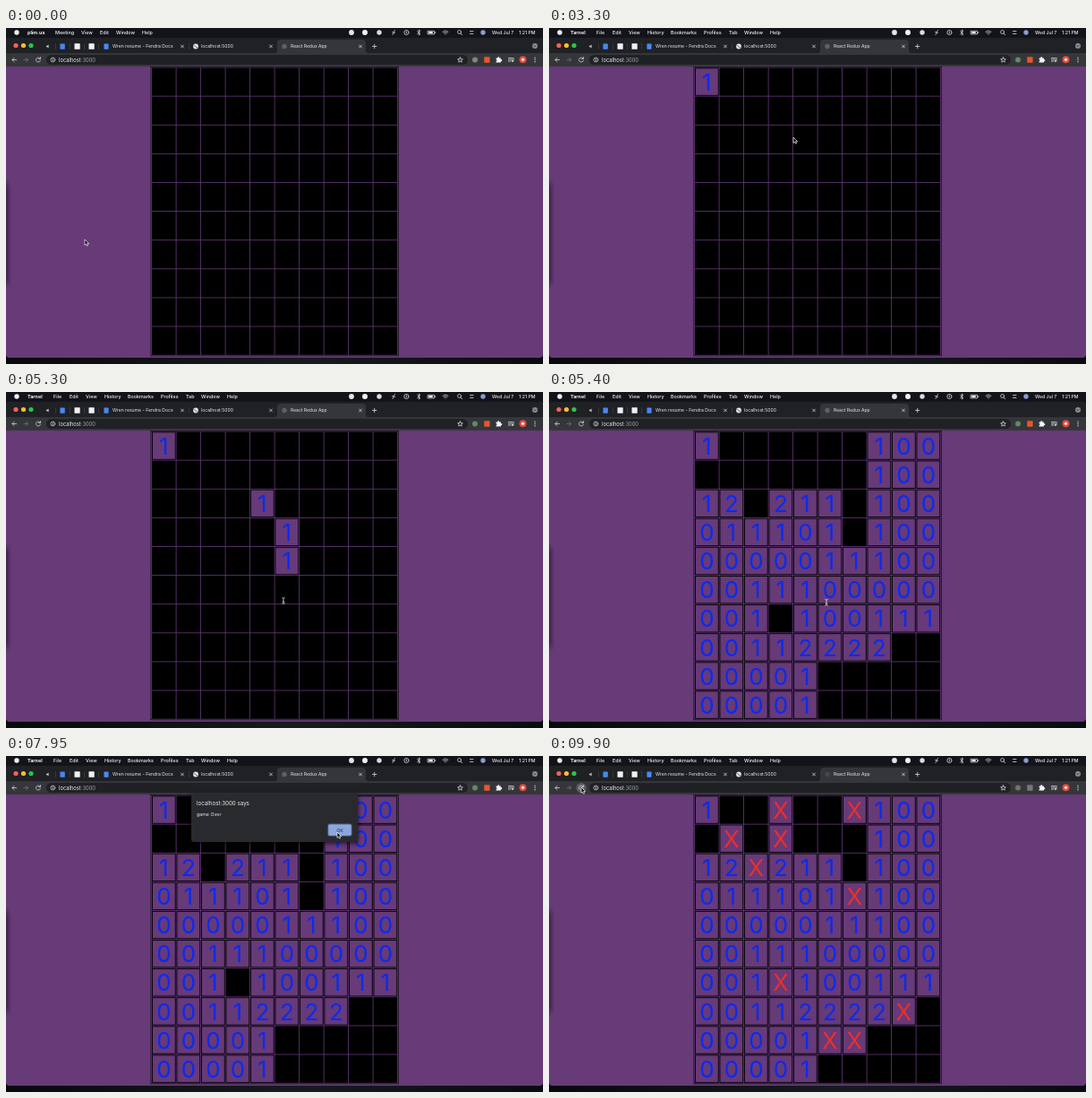
These frames come from a looping animation (600x375 px, 10000 ms). An HTML page:

```html
<!DOCTYPE html>
<html lang="en">
<head>
<meta charset="utf-8">
<title>Minesweeper</title>
<style>
  html, body { margin: 0; width: 100%; height: 100%; overflow: hidden; background: #0b0e13; }
  svg { display: block; width: 100%; height: 100%; }
  text { font-family: Inter, Roboto, sans-serif; fill: #e8eaed; white-space: pre; }
  .line { fill: none; stroke: #d5d7da; stroke-width: .8; stroke-linecap: round; stroke-linejoin: round; }
</style>
</head>
<body>
<svg id="stage" viewBox="0 0 600 375">
  <defs>
    <linearGradient id="edge">
      <stop offset="0" stop-color="#1c0f24" stop-opacity=".5"/>
      <stop offset="1" stop-color="#1c0f24" stop-opacity="0"/>
    </linearGradient>
    <linearGradient id="desk">
      <stop offset="0" stop-color="#07090c"/>
      <stop offset=".55" stop-color="#171b20"/>
      <stop offset="1" stop-color="#080b10"/>
    </linearGradient>
    <filter id="soft" x="-20%" y="-20%" width="140%" height="150%">
      <feGaussianBlur stdDeviation="2.2"/>
    </filter>
    <filter id="blur" x="-50%" y="-10%" width="200%" height="120%">
      <feGaussianBlur stdDeviation="0 3"/>
    </filter>
  </defs>
</svg>
<script>
const LOOP = 10000, STEP = 50;
const PURPLE = '#673a78', BLUE = '#0a2bf0', RED = '#ea2f2c';
const stage = document.getElementById('stage');

function add(parent, tag, attrs, text) {
  const el = document.createElementNS('http://www.w3.org/2000/svg', tag);
  for (const key in attrs) el.setAttribute(key, attrs[key]);
  if (text !== undefined) el.textContent = text;
  return parent.appendChild(el);
}
const group = (parent = stage, attrs = {}) => add(parent, 'g', attrs);
const rect = (p, x, y, width, height, fill, rx = 0) => add(p, 'rect', { x, y, width, height, fill, rx });
const dot = (p, cx, cy, r, fill) => add(p, 'circle', { cx, cy, r, fill });
const line = (p, d, attrs = {}) => add(p, 'path', { d, class: 'line', ...attrs });
const label = (p, x, y, size, text, attrs = {}) => add(p, 'text', { x, y, 'font-size': size, ...attrs }, text);
const show = (el, on) => el.setAttribute('visibility', on ? 'visible' : 'hidden');

// Desktop and menu bar
rect(stage, 0, 0, 600, 375, 'url(#desk)');
rect(stage, 0, 0, 600, 11, '#12141a');
dot(stage, 12, 5, 2.7, '#f2f2f2');

function menu(items) {
  const g = group();
  items.forEach(([x, name], i) =>
    label(g, x, 7, 5.4, name, { 'font-weight': i ? 500 : 700, style: 'fill:#f4f4f4' }));
  return g;
}
const callMenu = menu([[24, 'plim.us'], [55, 'Meeting'], [84, 'View'], [105, 'Edit'], [123, 'Window'], [152, 'Help']]);
const webMenu = menu([[24, 'Tarnel'], [53, 'File'], [71, 'Edit'], [89, 'View'], [110, 'History'], [136, 'Bookmarks'],
  [173, 'Profiles'], [201, 'Tab'], [218, 'Window'], [247, 'Help']]);

dot(stage, 386, 5, 2.9, '#e6e6e6');
dot(stage, 401, 5, 3, '#f0f0f0');
dot(stage, 417, 5, 2.7, '#dcdcdc');
line(stage, 'M432 7.5L434.5 2.5M431.5 4.5L434.5 5.5');
line(stage, 'M450 5a2.6 2.6 0 1 1-5.2 0a2.6 2.6 0 1 1 5.2 0M447.4 3.8v2.2');
line(stage, 'M459.6 3.4L463 6.6L461.3 8V2L463 3.4L459.6 6.6', { 'stroke-width': .6 });
line(stage, 'M471.5 3.3h7v3.6h-7zM479.7 4.5v1.2', { 'stroke-width': .6 });
rect(stage, 472.2, 4, 4.6, 2.2, '#e8e8e8');
line(stage, 'M488 4.2q3-2.6 6 0M489.2 5.7q1.8-1.5 3.6 0M491 7.2v.1');
line(stage, 'M508.6 4.5a2 2 0 1 1-4 0a2 2 0 1 1 4 0M508 6l1.7 1.8');
line(stage, 'M518.5 3.5h3.5M518.5 6.5h3.5', { 'stroke-width': 1.5 });
dot(stage, 533, 5, 2.7, '#8d9bd0');
label(stage, 543, 7, 5.2, 'Wed Jul 7', { 'font-weight': 500 });
label(stage, 573, 7, 5.2, '1:21 PM', { 'font-weight': 500 });

// Browser window
add(stage, 'path', { d: 'M0 15q0-4 4-4H596q4 0 4 4V364q0 4-4 4H4q-4 0-4-4z', fill: PURPLE });
add(stage, 'path', { d: 'M0 28V15q0-4 4-4H596q4 0 4 4V28z', fill: '#202124' });
rect(stage, 0, 28, 600, 15, '#35363a');
rect(stage, 0, 42.6, 600, .6, '#4a3b50');
['#ff5f57', '#febc2e', '#28c840'].forEach((c, i) => dot(stage, 11 + i * 8.5, 19.5, 2.6, c));

const cross = x => line(stage, `M${x - 1.4} 19.1l2.8 2.8m0-2.8l-2.8 2.8`, { 'stroke-width': .7 });
add(stage, 'path', { d: 'M300 28q3 0 3-3V17q0-4 4-4H398q4 0 4 4V25q0 3 3 3z', fill: '#35363a' });
add(stage, 'path', { d: 'M45 19.7h1.2l1.4-1.3v4.2l-1.4-1.3H45z', fill: '#c8cacd' });
rect(stage, 60.4, 17.5, 5.4, 6.2, '#4688f4', .6);
[76.5, 92.5].forEach(x => rect(stage, x, 17.3, 6.2, 6.4, '#f1f1f1', .5));
rect(stage, 109.4, 17.5, 5.2, 6.2, '#4688f4', .6);
label(stage, 119, 22.4, 5.1, 'Wren resume - Fendra Docs');
cross(197);
dot(stage, 212, 20.5, 2.9, '#e3e4e6');
line(stage, 'M210 19.5q2 .2 2 1.4t1.8 1', { stroke: '#202124', style: 'stroke:#55585c' });
label(stage, 218, 22.4, 5.1, 'localhost:5000');
cross(296);
[55, 71, 87, 103, 204.5].forEach(x => rect(stage, x, 17, .5, 7, '#4a4c50'));
const favicon = dot(stage, 311, 20.5, 2.7, '#5d6166');
label(stage, 318, 22.4, 5, 'React Redux App');
cross(396);
line(stage, 'M409.5 20.5h4.4m-2.2-2.2v4.4');
dot(stage, 591, 20, 3, '#8b8d91');
line(stage, 'M589.8 19.6l1.2 1.2l1.2-1.2', { style: 'stroke:#202124' });

// Toolbar
line(stage, 'M11.6 35.5H7m2.1-2.2L6.9 35.5l2.2 2.2');
line(stage, 'M20 35.5h4.6m-2.1-2.2l2.2 2.2l-2.2 2.2', { style: 'stroke:#707276' });
const hover = dot(stage, 36, 35.5, 5.6, '#5b5c60');
line(stage, 'M38.2 34.2a2.5 2.5 0 1 0 .2 2.2M38.6 32.6v1.9h-1.9');
rect(stage, 45, 30, 471, 11, '#202124', 5.5);
line(stage, 'M54.8 35.5a2.4 2.4 0 1 1-4.8 0a2.4 2.4 0 1 1 4.8 0M52.4 35.4v1.2M52.4 34.2v.1', { 'stroke-width': .6 });
const url = label(stage, 59, 37.5, 5.8, 'localhost');
add(url, 'tspan', { style: 'fill:#9aa0a6' }, ':3000');
line(stage, 'M507.5 32.8l.8 1.8l2 .2l-1.5 1.3l.5 2l-1.8-1l-1.8 1l.5-2l-1.5-1.3l2-.2z', { 'stroke-width': .6 });
const extA = dot(stage, 524, 35.5, 3, '#5f8a63');
const extB = rect(stage, 534.2, 32.3, 6.4, 6.4, '#e4572e', .8);
add(stage, 'path', { d: 'M547.6 33.6h1.7a1 1 0 1 1 1.9 0h1.7v1.6a1 1 0 1 1 0 1.9v1.5h-5.3v-1.6a.9 .9 0 1 0 0-1.8z', fill: '#f1f3f4' });
line(stage, 'M561.4 33.5h4.5M561.4 35.3h4.5M561.4 37.1h2.4M567 33.3v3.4', { 'stroke-width': .8 });
dot(stage, 565.9, 37.1, 1, '#d5d7da');
dot(stage, 577.5, 35.3, 4, '#e5483f');
dot(stage, 577.5, 35.3, 1.7, '#f3dcd8');
[33.2, 35.5, 37.8].forEach(y => dot(stage, 591, y, .7, '#d5d7da'));
add(stage, 'rect', { x: 0, y: 174, width: 6, height: 111, fill: 'url(#edge)', filter: 'url(#blur)' });

// Board: digits open in play, X marks a mine, dots stay covered
const ROWS = ['1..X..X100', '.X.X...100', '12X211.100', '011101X100', '0000011100',
  '0011100000', '001X100111', '00112222X.', '00001XX...', '00001.....'];
const CLICKS = { '0,0': 2500, '2,4': 3500, '3,5': 4200, '4,5': 4750 };
const FLOOD = 5350, ALERT = 6950, OVER = 8100, RELOAD = 9900;
const X0 = 162.6, Y0 = 44, W = 27.5, H = 32.12;

rect(stage, X0 - 1, Y0 - 1, 10 * W + 2, 10 * H + 2, '#000');
for (let i = 0; i <= 10; i++) {
  rect(stage, X0 + i * W - .4, Y0, .8, 10 * H, '#65397a');
  rect(stage, X0, Y0 + i * H - .4, 10 * W, .8, '#65397a');
}
const cells = [];
ROWS.forEach((row, r) => [...row].forEach((mark, c) => {
  if (mark === '.') return;
  const mine = mark === 'X', x = X0 + c * W, y = Y0 + r * H, el = group();
  rect(el, x + 1.3, y + 1.3, W - 2.6, H - 2.6, PURPLE);
  label(el, x + W / 2, y + H / 2 + 9.6, 26, mark, { 'text-anchor': 'middle', style: `fill:${mine ? RED : BLUE}` });
  cells.push({ el, at: mine ? OVER : CLICKS[`${r},${c}`] || FLOOD });
}));

// Alert box
const box = group();
add(box, 'rect', { x: 206, y: 43, width: 188, height: 55, rx: 3, fill: '#000', opacity: .55, filter: 'url(#soft)' });
add(box, 'path', { d: 'M207 42H393V93q0 3-3 3H210q-3 0-3-3z', fill: '#292a2d' });
label(box, 213, 55, 6.2, 'localhost:3000 says');
label(box, 213, 67, 5.3, 'game Over');
rect(box, 359.4, 75.6, 27.2, 14, '#51689a', 2.4);
const ok = rect(box, 360.3, 76.5, 25.4, 12.2, '#8ab4f8', 1.8);
label(box, 373, 84.5, 5.2, 'OK', { 'text-anchor': 'middle', 'font-weight': 500, style: 'fill:#2f3c5c' });

// Pointer
const pointer = group();
const arrow = add(pointer, 'path', { d: 'M0 0V6.3L1.5 5L2.5 7.2L3.6 6.7L2.6 4.6H4.6Z',
  fill: '#000', stroke: '#fff', 'stroke-width': .7, 'stroke-linejoin': 'round' });
const beam = line(pointer, 'M-1.3-3.4Q0-3.4 0-2.4V2.4Q0 3.4-1.3 3.4M1.3-3.4Q0-3.4 0-2.4M0 2.4Q0 3.4 1.3 3.4M-.8 1h1.6', { 'stroke-width': .7 });
const PATH = [[0, 88, 236], [250, 88, 236], [500, 213, 116], [650, 213, 116], [950, 300, 94], [1050, 300, 94],
  [1400, 372, 44], [1450, 372, 44], [1600, 219, 58], [1800, 219, 58], [1950, 172, 54], [2600, 172, 54],
  [3250, 273, 122], [3600, 273, 122], [4000, 314, 158], [4250, 314, 158], [4600, 312, 190], [4800, 312, 190],
  [5050, 310, 221], [5250, 310, 221], [5300, 310, 233], [5600, 310, 240], [5900, 120, 97], [6050, 120, 97],
  [6450, 248, 79], [7250, 248, 79], [7900, 370, 85], [9000, 370, 85], [9750, 36, 35], [LOOP, 36, 35]];

function pointerAt(t) {
  const i = PATH.findIndex(p => p[0] > t);
  const [t0, x0, y0] = PATH[i - 1], [t1, x1, y1] = PATH[i];
  const u = (t - t0) / (t1 - t0), k = u * u * (3 - 2 * u);
  return [x0 + (x1 - x0) * k, y0 + (y1 - y0) * k];
}

function render(t) {
  show(callMenu, t < 50);
  show(webMenu, t >= 50);
  cells.forEach(({ el, at }) => show(el, t >= at));
  show(box, t >= ALERT && t < OVER);
  ok.setAttribute('fill', t >= 7800 ? '#8da6dc' : '#8ab4f8');
  show(hover, t >= 9700);
  const loading = t >= RELOAD;
  favicon.setAttribute('fill', loading ? '#45474b' : '#5d6166');
  extA.setAttribute('fill', loading ? '#77716a' : t < 50 ? '#7b8a78' : '#5f8a63');
  extB.setAttribute('fill', loading ? '#75777b' : '#e4572e');
  const typing = t >= 5300 && t < 5700;
  show(arrow, !typing);
  show(beam, typing);
  pointer.setAttribute('transform', `translate(${pointerAt(t)})`);
}

const start = performance.now();
function tick() {
  const t = (performance.now() - start) % LOOP;
  render(Math.floor(t / STEP) * STEP);
  requestAnimationFrame(tick);
}
tick();
</script>
</body>
</html>
```
